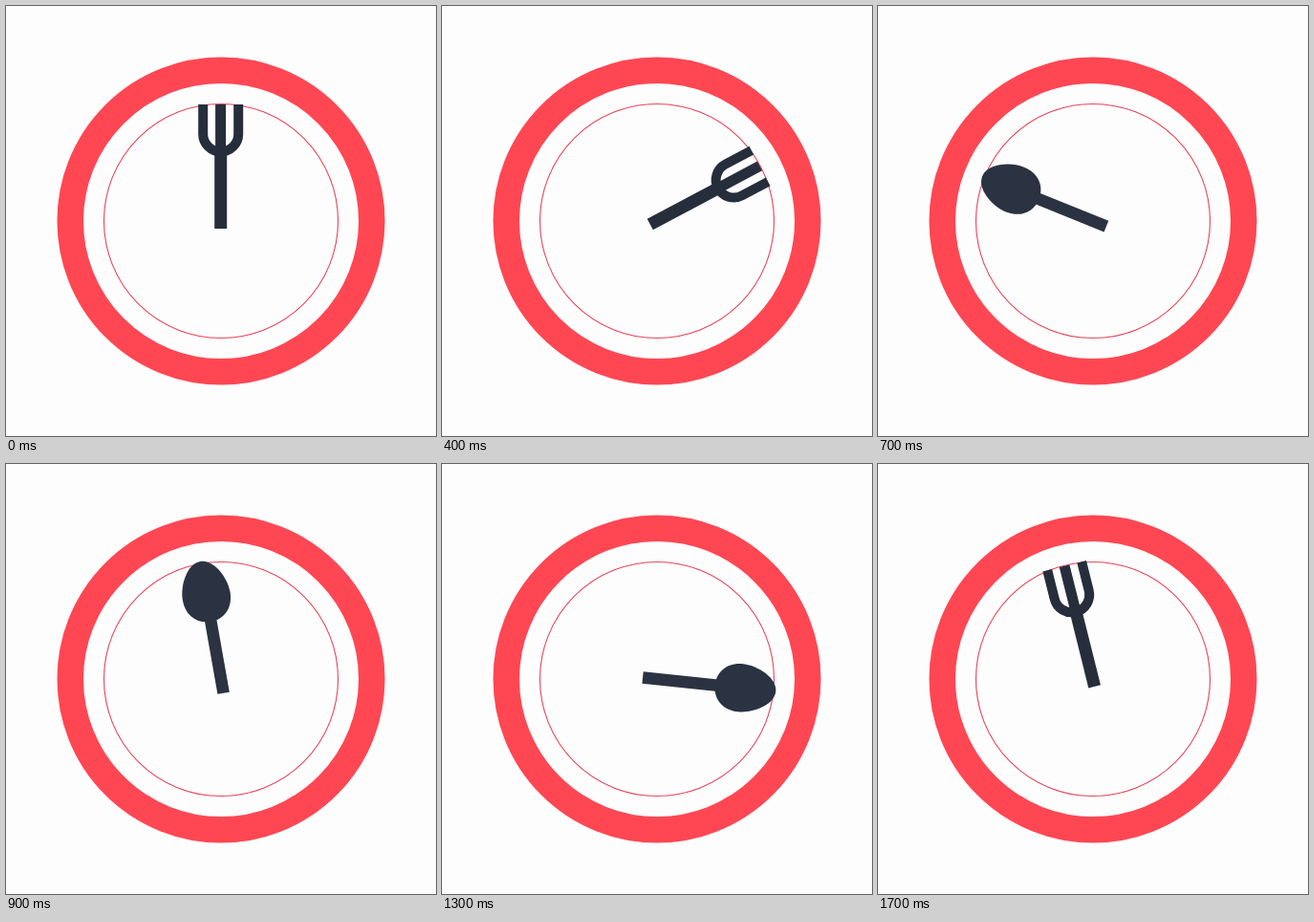
Recreate the animation shown at these times as an HTML page. Size 450 by 450 pixels, loop 1800 ms.

```html
<!DOCTYPE html>
<html lang="en">
<head>
<meta charset="utf-8">
<title>Cutlery clock</title>
<style>
  html, body { margin: 0; width: 100%; height: 100%; overflow: hidden; background: #fdfdfd; }
  svg { display: block; width: 100%; height: 100%; }
</style>
</head>
<body>
<svg viewBox="0 0 450 450">
  <g transform="translate(225 225)" fill="none">
    <circle r="157.75" stroke="#ff4753" stroke-width="27.5"/>
    <circle r="122.5" stroke="#e8435a" stroke-width="1.1"/>
    <g id="hand">
      <g id="fork" stroke="#262e3c">
        <path d="M-18.8-122V-91a18.5 18.5 0 0 0 37 0V-122" stroke-width="10"/>
        <path d="M-.4-122V-70" stroke-width="11"/>
        <path d="M-.3-72V8" stroke-width="13"/>
      </g>
      <g id="spoon" fill="#2b3342">
        <path d="M0-125C14-125 25.2-104 25.2-88C25.2-71 14-61 0-61S-25.2-71-25.2-88C-25.2-104-14-125 0-125Z"/>
        <path d="M-6.3-64H6.3V15H-6.3Z"/>
      </g>
    </g>
  </g>
</svg>
<script>
  const STEP = 100;
  // Clockwise angle per step: two turns, slow at twelve and fast at six.
  const ANGLES = [0, 4, 14, 33, 62, 112, 210, 292, 328, 350, 366, 383, 412, 456, 548, 635, 682, 706];
  const [hand, fork, spoon] = ['hand', 'fork', 'spoon'].map(id => document.getElementById(id));
  const show = (el, on) => el.setAttribute('visibility', on ? 'visible' : 'hidden');

  function draw(ms) {
    const angle = ANGLES[Math.floor(ms / STEP) % ANGLES.length];
    const isSpoon = angle > 180 && angle < 540;
    hand.setAttribute('transform', `rotate(${angle})`);
    show(fork, !isSpoon);
    show(spoon, isSpoon);
  }

  const start = performance.now();
  function tick() {
    draw(performance.now() - start);
    requestAnimationFrame(tick);
  }
  tick();
</script>
</body>
</html>
```
